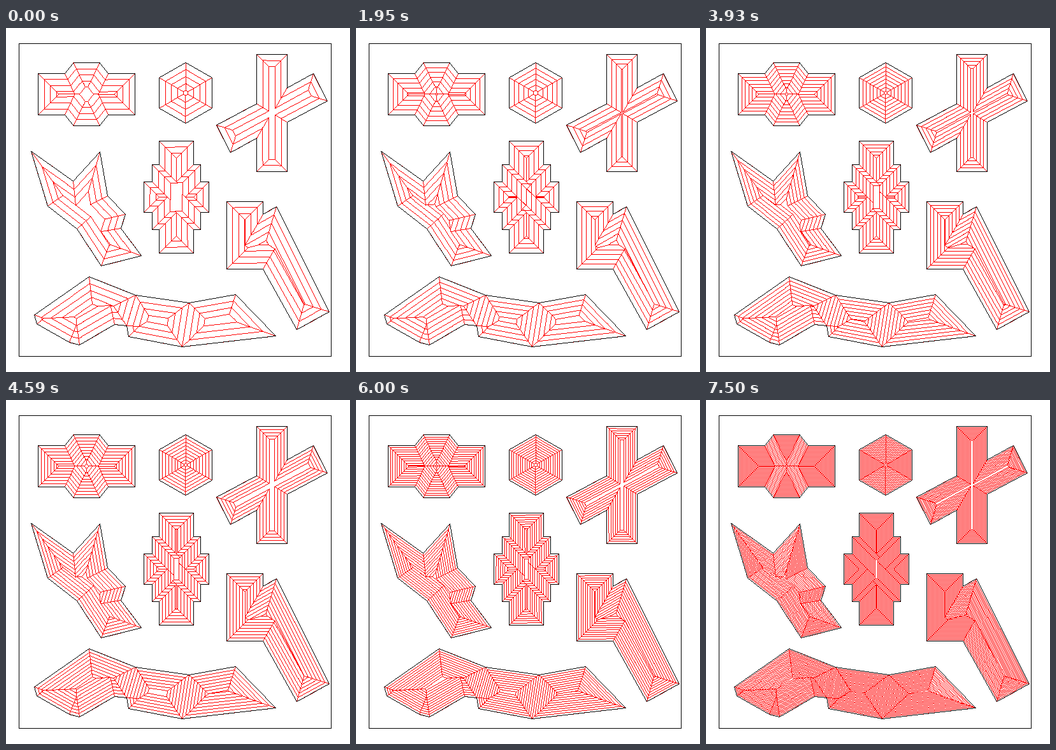
An HTML page with a canvas for the animation above (7530 ms loop, 540 by 540 pixels).

```html
<!DOCTYPE html>
<html lang="en">
<head>
<meta charset="utf-8">
<title>Polygon insets</title>
<style>
html, body { margin: 0; width: 100%; height: 100%; overflow: hidden; background: #fff; }
canvas { display: block; width: 540px; height: 540px; image-rendering: pixelated; }
</style>
</head>
<body>
<canvas id="stage" width="540" height="540"></canvas>
<script>
const SIZE = 540, LOOP = 7530, STEP = 30;
const WHITE = 0xffffffff, BLACK = 0xff000000, RED = 0xff0000ff;
const ctx = document.getElementById('stage').getContext('2d');
const image = ctx.createImageData(SIZE, SIZE);
const pixels = new Uint32Array(image.data.buffer);

const pairs = (...a) => a.flatMap((v, i) => i % 2 ? [] : [[v, a[i + 1]]]);
const place = (pts, cx, cy, sx = 1, sy = 1) => pts.map(([x, y]) => [cx + sx * x, cy + sy * y]);

// Completes a shape from its upper right quarter.
function mirror(cx, cy, quarter) {
  const back = [...quarter].reverse();
  return [...place(quarter, cx, cy), ...place(back, cx, cy, 1, -1),
    ...place(quarter, cx, cy, -1, -1), ...place(back, cx, cy, -1, 1)];
}

// Completes a shape from the half that a half turn maps to the rest.
const halfTurn = (cx, cy, half) => [...place(half, cx, cy), ...place(half, cx, cy, -1, -1)];

// Quarter outline of nested boxes, given by half width and half height.
const stairs = boxes => boxes.flatMap(([w, h], i) =>
  i ? [[boxes[i - 1][0], -h], [w, -h]] : [[w, -h]]);

const hexagon = (cx, cy, r) => [...Array(6)].map((_, i) => {
  const a = (i - 1.5) * Math.PI / 3;
  return [cx + r * Math.cos(a), cy + r * Math.sin(a)];
});

const bird = pairs(39, 193, 105, 240, 147, 194, 159, 263, 187, 292, 180, 314,
  212, 357, 149, 373, 111, 315, 65, 279);
const elbow = pairs(346, 272, 403, 272, 403, 292, 424, 280, 507, 445, 456, 473,
  403, 378, 346, 378);
const fish = pairs(130, 390, 203, 419, 287, 431, 360, 418, 423, 483, 276, 500,
  192, 484, 189, 467, 170, 465, 115, 497, 99, 493, 48, 464, 44, 450);

// The fish is shrunk in three parts that share edges.
const fishParts = [
  [...fish.slice(0, 2), ...fish.slice(7)],
  [...fish.slice(1, 3), ...fish.slice(5, 8)],
  fish.slice(2, 6)
];

const whole = pts => ({ edge: pts, parts: [pts] });
const shapes = [
  whole(mirror(126, 103.5, pairs(20.5, -49.5, 34, -32.5, 76, -32.5))),
  whole(hexagon(281.5, 101.5, 47.9)),
  whole(halfTurn(417, 133, pairs(-24, -92, 24, -92, 24, -39.5, 65, -62, 87, -19, 24, 14.5))),
  whole(bird),
  whole(mirror(267, 265, stairs(pairs(27, 88, 38, 51, 51, 24)))),
  whole(elbow),
  { edge: fish, parts: fishParts }
];

const dot = (a, x, y) => a.x * x + a.y * y;
const along = n => ({ x: n.y, y: -n.x });
const moved = (p, dt) => ({ ...p, x: p.x + p.u.x * dt, y: p.y + p.u.y * dt });
const area = poly => poly.reduce((sum, p, i) => {
  const q = poly[(i + 1) % poly.length];
  return sum + (p.x * q.y - p.y * q.x) / 2;
}, 0);

// Shrinks a polygon at unit speed and records each phase between two events.
function shrink(poly, t, phases, depth = 0) {
  const n = poly.length;
  if (n < 3 || depth > 80) return;
  if (area(poly) < 1) {
    phases.push({ poly, from: t, to: t });
    return;
  }
  const at = i => poly[(i + n) % n];
  poly.forEach((p, i) => {
    const a = at(i - 1).n, b = p.n, k = Math.max(1e-9, 1 + dot(a, b.x, b.y));
    p.u = { x: (a.x + b.x) / k, y: (a.y + b.y) / k };
  });

  let dt = Infinity, hit = null;
  const offer = (time, event) => {
    if (time < dt) { dt = Math.max(0, time); hit = event; }
  };
  for (let i = 0; i < n; i++) {
    const p = at(i), q = at(i + 1), dir = along(p.n);
    const rate = dot(dir, q.u.x - p.u.x, q.u.y - p.u.y);
    if (rate < 0) offer(-dot(dir, q.x - p.x, q.y - p.y) / rate, { i });

    const m = at(i - 1).n;
    if (m.x * p.n.y - m.y * p.n.x > -1e-7) continue;
    for (let k = 2; k < n - 2; k++) {
      const a = at(i + k), b = at(i + k + 1);
      const gap = dot(a.n, p.x - a.x, p.y - a.y);
      const speed = 1 - dot(a.n, p.u.x, p.u.y);
      if (speed <= 0 || gap < -1e-6) continue;
      const time = gap / speed;
      if (time >= dt) continue;
      const c = moved(p, time), a2 = moved(a, time), b2 = moved(b, time), d = along(a.n);
      if (dot(d, c.x - a2.x, c.y - a2.y) > -1e-5 && dot(d, b2.x - c.x, b2.y - c.y) > -1e-5)
        offer(time, { i, k });
    }
  }
  if (!hit) return;

  phases.push({ poly, from: t, to: t + dt });
  const next = [...Array(n)].map((_, j) => moved(at(hit.i + j), dt));
  const rest = list => shrink(list, t + dt, phases, depth + 1);
  if (hit.k) {
    rest(next.slice(0, hit.k + 1).map(p => ({ ...p })));
    rest([{ ...next[0], n: next[hit.k].n }, ...next.slice(hit.k + 1)]);
  } else {
    rest(next.slice(1));
  }
}

const points = list => list.map(([x, y]) => ({ x: x + 0.5, y: y + 0.5 }));

function prepare(list, seed) {
  // A tiny nudge keeps events from falling together.
  const pts = points(list).map((p, i) => ({
    x: p.x + 0.004 * Math.sin(i * 7.3 + seed),
    y: p.y + 0.004 * Math.cos(i * 4.7 + seed)
  }));
  const poly = pts.map((p, i) => {
    const q = pts[(i + 1) % pts.length], len = Math.hypot(q.x - p.x, q.y - p.y);
    return { ...p, n: { x: (p.y - q.y) / len, y: (q.x - p.x) / len } };
  });
  const phases = [];
  shrink(poly, 0, phases);
  return { phases, height: Math.max(...phases.map(f => f.to)) };
}

const models = shapes.flatMap(s => s.parts).map(prepare);
const edges = shapes.map(s => points(s.edge));
const border = points(pairs(20, 24, 510, 24, 510, 515, 20, 515)).map(p => ({ x: p.x - 0.5, y: p.y }));

function line(a, b, color) {
  const dx = b.x - a.x, dy = b.y - a.y;
  const n = Math.ceil(Math.max(Math.abs(dx), Math.abs(dy))) || 1;
  for (let i = 0; i <= n; i++)
    pixels[Math.floor(a.y + dy * i / n) * SIZE + Math.floor(a.x + dx * i / n)] = color;
}

function outline(pts, color) {
  pts.forEach((p, i) => line(p, pts[(i + 1) % pts.length], color));
}

function draw(now) {
  const gap = 9.5 - 0.03 * Math.floor(now % LOOP / STEP);
  pixels.fill(WHITE);
  for (const { phases, height } of models) {
    const last = Math.floor(height / gap) * gap;
    for (const { poly, from, to } of phases) {
      if (from === to && from < last) outline(poly, RED);
      for (let h = Math.ceil(from / gap) * gap; h < to; h += gap)
        outline(poly.map(p => moved(p, h - from)), RED);
      const end = Math.min(to, last);
      if (end > from) poly.forEach(p => line(p, moved(p, end - from), RED));
    }
  }
  [...edges, border].forEach(pts => outline(pts, BLACK));
  ctx.putImageData(image, 0, 0);
  requestAnimationFrame(draw);
}
requestAnimationFrame(draw);
</script>
</body>
</html>
```
